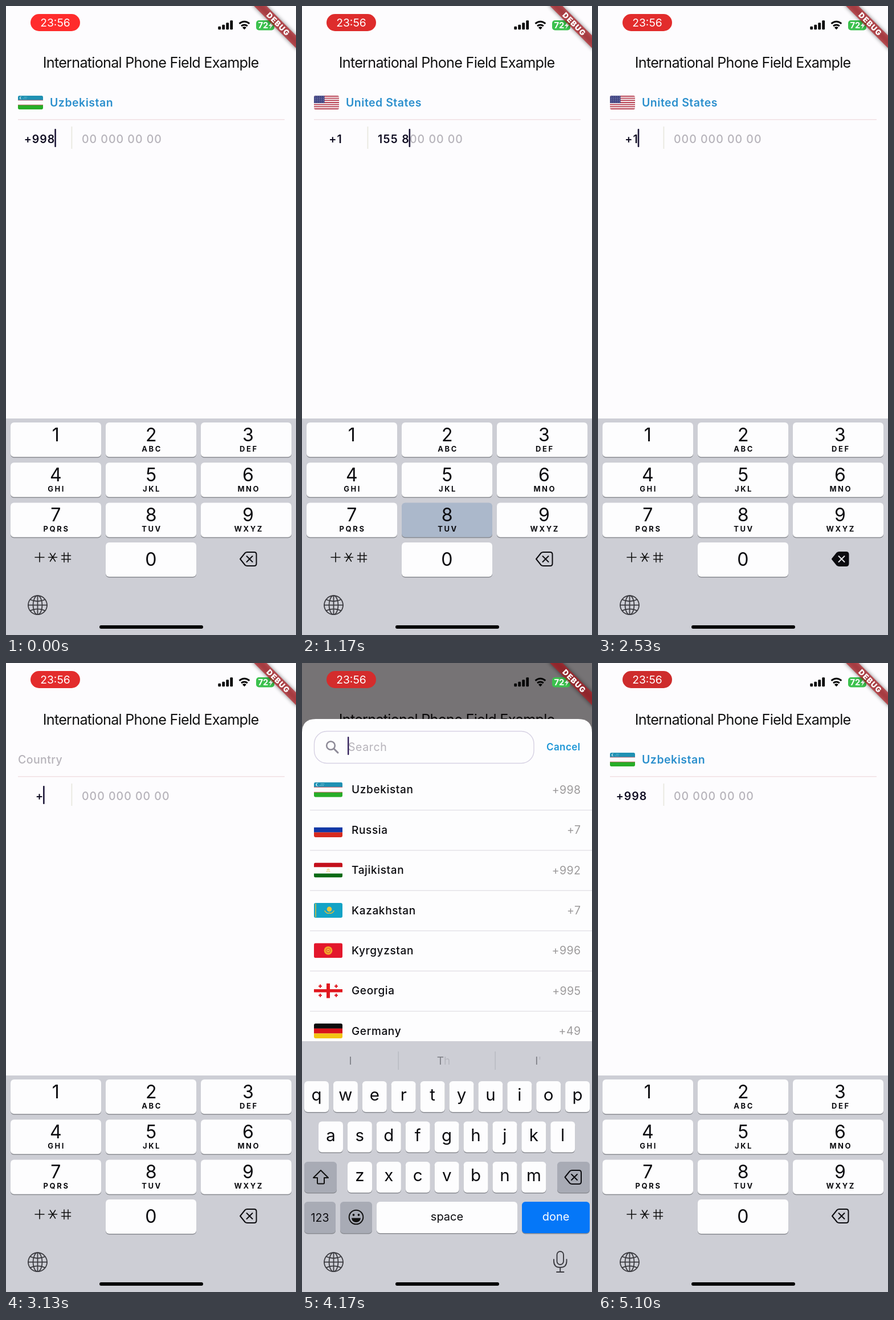
An HTML page for the animation above (5130 ms loop, 509 by 1101 pixels).

```html
<!DOCTYPE html>
<html lang="en">
<head>
<meta charset="utf-8">
<title>International Phone Field Example</title>
<style>
html, body { margin: 0; width: 100%; height: 100%; overflow: hidden; background: #fdfcfe; }
svg { display: block; width: 100%; height: 100%; }
text { font-family: Inter, Roboto, "Liberation Sans", sans-serif; white-space: pre; }
</style>
</head>
<body>
<svg id="stage" viewBox="0 0 509 1101"></svg>
<script>
const LOOP = 5130;
const NUMBER = '155 835 20 46';
const INK = '#100d22', HINT = '#b6b3ba', BOARD = '#cdced5', GREY = '#a8abb5', BLUE = '#2b8fcd';
const KEY = '#fdfdfe', PRESSED = '#abb8cb';

// Drawing helpers
const rect = (x, y, w, h, fill, r = 0, more = '') =>
  `<rect x="${x}" y="${y}" width="${w}" height="${h}" rx="${r}" fill="${fill}" ${more}/>`;
const line = (d, w = 2, color = '#111', more = '') =>
  `<path d="${d}" fill="none" stroke="${color}" stroke-width="${w}" stroke-linecap="round" stroke-linejoin="round" ${more}/>`;
const circle = (x, y, r, fill, more = '') => `<circle cx="${x}" cy="${y}" r="${r}" fill="${fill}" ${more}/>`;
const text = (x, y, s, size, { fill = '#0b0b0f', weight = 400, ls = 0, anchor = 'start', id = '' } = {}) => {
  const shift = anchor === 'middle' ? ls / 2 : anchor === 'end' ? ls : 0;
  return `<text ${id && `id="${id}"`} x="${x + shift}" y="${y}" font-size="${size}" font-weight="${weight}" ` +
    `letter-spacing="${ls}" text-anchor="${anchor}" fill="${fill}">${s}</text>`;
};
const mid = (x, y, s, size, o = {}) => text(x, y, s, size, { anchor: 'middle', ...o });
const group = (id, body) => `<g id="${id}">${body}</g>`;
const times = (n, f) => Array.from({ length: n }, (_, i) => f(i)).join('');

// Flags on a 50 x 26 field
const bands = (...c) => c.map((k, i) => rect(0, i * 26 / 3, 50, 8.8, k)).join('');
const FLAGS = {
  uz: bands('#1f91b3', '#fcfcfc', '#27ad27') + rect(0, 8.2, 50, .9, '#cf5a66') + rect(0, 17, 50, .9, '#cf5a66') +
    circle(6, 4.2, 2.6, '#eaf6f9') + circle(7.1, 4.2, 2.3, '#1f91b3') +
    times(4, i => circle(10.5 + i * 2, 5.8, .5, '#eaf6f9') + circle(12.5 + i * 1.6, 3, .5, '#eaf6f9')),
  ru: bands('#fcfcfc', '#1238a6', '#d62a1e'),
  tj: rect(0, 0, 50, 8, '#c4101c') + rect(0, 8, 50, 11, '#fcfcfc') + rect(0, 19, 50, 7, '#0a6a14') +
    line('M22 15.5Q25 13.5 28 15.5M23 12.5L25 11L27 12.5', 1.1, '#ecc968'),
  kz: rect(0, 0, 50, 26, '#12a3c6') + rect(2, 1, 2, 24, '#a9b95a') + circle(27, 11, 4.3, '#e8c63c') +
    line('M19 14Q23 20 27 17.5Q31 20 35 14', 1.7, '#d9bd3e'),
  kg: rect(0, 0, 50, 26, '#e3172c') + circle(25, 13, 7.4, '#f2a62a') + circle(25, 13, 4.2, '#e3402c') +
    circle(25, 13, 3.2, '#f6c63c') + line('M23 12Q25 14 27 12M23 14Q25 12 27 14', .7, '#d0342a'),
  ge: rect(0, 0, 50, 26, '#fcfcfc') + rect(22, 0, 6, 26, '#e0181f') + rect(0, 10.3, 50, 5.4, '#e0181f') +
    [[11, 5], [39, 5], [11, 21], [39, 21]].map(([x, y]) =>
      rect(x - 3, y - 1, 6, 2, '#e0181f') + rect(x - 1, y - 3, 2, 6, '#e0181f')).join(''),
  de: bands('#0c0c0c', '#d8141c', '#f2c414'),
  us: times(13, i => rect(0, i * 2, 50, 2.05, i % 2 ? '#f7eff1' : '#b33447')) + rect(0, 0, 21, 14, '#3f4382') +
    times(20, i => circle(2.5 + i % 5 * 4, 2 + (i / 5 | 0) * 3.3, .65, '#c9cae0'))
};
const flag = (code, x, y, w, h) =>
  `<g transform="translate(${x} ${y}) scale(${w / 50} ${h / 26})" clip-path="url(#round)">${FLAGS[code]}</g>`;

// Page
const country = (id, name) => group(id,
  flag(id, 21, 157, 44, 24) + text(77, 176.3, name, 19.5, { fill: BLUE, weight: 600, ls: .5 }));
const page = rect(0, 0, 509, 1101, '#fdfcfe') +
  mid(254.5, 108, 'International Phone Field Example', 25.2, { ls: -.74, fill: '#111' }) +
  country('uz', 'Uzbekistan') + country('us', 'United States') +
  group('none', text(21, 176.3, 'Country', 19.5, { fill: HINT, weight: 500, ls: .4 })) +
  rect(21, 198, 468, 1.5, '#f1e0e4') + rect(114.5, 211, 1.8, 39, '#e9e8e0') +
  mid(58.5, 240, '', 19.5, { id: 'code', weight: 600, ls: 1, fill: INK }) +
  `<text x="133" y="240" font-size="19.5"><tspan id="typed" font-weight="600" letter-spacing="1.3" fill="${INK}"></tspan>` +
  `<tspan id="rest" font-weight="500" letter-spacing="1" fill="${HINT}"></tspan></text>` +
  rect(0, 215, 2.6, 32, '#1d1738', 1, 'id="caret"');

// Country sheet
const ROWS = [['uz', 'Uzbekistan', 998], ['ru', 'Russia', 7], ['tj', 'Tajikistan', 992], ['kz', 'Kazakhstan', 7],
  ['kg', 'Kyrgyzstan', 996], ['ge', 'Georgia', 995], ['de', 'Germany', 49], ['us', 'United States', 1]];
const sheet = `<path d="M0 1101V122Q0 98 24 98H485Q509 98 509 122V1101Z" fill="#fdfdfe"/>` +
  rect(21.5, 119.5, 385.5, 56, 'none', 22, 'stroke="#d6d1e3" stroke-width="1.4"') +
  circle(50.5, 144.5, 7.3, 'none', 'stroke="#8e8b98" stroke-width="2.6"') + line('M56 150L63 157', 3, '#8e8b98') +
  text(81, 154, 'Search', 19.5, { fill: HINT, ls: .6 }) + rect(80, 129, 2.4, 32, '#32205a', 1, 'id="seek"') +
  text(429, 153, 'Cancel', 17, { fill: '#1d96d6', weight: 600, ls: .4 }) +
  ROWS.map(([code, name, dial], i) => {
    const y = 221.7 + i * 70.4;
    return flag(code, 21, y - 13, 50, 26) + text(87, y + 6.6, name, 19, { weight: 500, ls: .65 }) +
      text(489, y + 7, '+' + dial, 19.5, { fill: '#9d9b9c', ls: .4, anchor: 'end' }) +
      rect(14, y + 35.2, 495, 1.3, '#e1dfe5');
  }).join('');

// Keyboards
const key = (x, y, w, h, fill = KEY, id = '') =>
  rect(x, y + 1.5, w, h, '#898b91', 6) + rect(x, y, w, h, fill, 6, id && `id="${id}"`);
const globe = circle(55.5, 1048.7, 16.5, 'none', 'stroke="#3b3b40" stroke-width="1.8"') +
  `<ellipse cx="55.5" cy="1048.7" rx="8" ry="16.5" fill="none" stroke="#3b3b40" stroke-width="1.8"/>` +
  line('M55.5 1032V1065M39 1048.7H72M42.5 1039Q55.5 1045 68.5 1039M42.5 1058.4Q55.5 1052.4 68.5 1058.4', 1.8, '#3b3b40');
const erase = (x, y, id) =>
  line(`M${x - 15.5} ${y}L${x - 7} ${y - 10.5}Q${x - 5.5} ${y - 12} ${x - 3} ${y - 12}H${x + 9}Q${x + 13} ${y - 12} ${x + 13} ${y - 8}` +
    `V${y + 8}Q${x + 13} ${y + 12} ${x + 9} ${y + 12}H${x - 3}Q${x - 5.5} ${y + 12} ${x - 7} ${y + 10.5}Z`, 2, '#0b0b0f', `id="${id}"`) +
  line(`M${x - 4} ${y - 5}l10 10m0 -10l-10 10`, 2, '#0b0b0f', `id="${id}X"`);

const LETTERS = ['', 'ABC', 'DEF', 'GHI', 'JKL', 'MNO', 'PQRS', 'TUV', 'WXYZ'];
const CENTERS = [87.3, 254.7, 425];
const pad = rect(0, 722, 509, 379, BOARD) + LETTERS.map((s, i) => {
  const c = i % 3, y = 729 + (i / 3 | 0) * 70.2;
  return key(8 + c * 167, y, 159, 60.3, KEY, 'k' + (i + 1)) +
    mid(CENTERS[c], y + 33, i + 1, 32) + mid(CENTERS[c], y + 51, s, 13, { weight: 700, ls: 2.6 });
}).join('') + key(175, 939, 159, 60, KEY, 'k0') + mid(254.3, 980, 0, 32) +
  line('M51 965H67M59 957V973M74.5 965H89.5M77.5 958L86.5 972M86.5 958L77.5 972', 1.6) +
  line('M102 957V973.5M109 957V973.5M97.5 962H113.5M97.5 968.5H113.5', 1.5) +
  erase(426.5, 968, 'del');

const alphaRow = (s, x, y) => [...s].map((c, i) =>
  key(x + i * 50.9, y, 43, 54) + mid(x + i * 50.9 + 21.5, y + 34, c, 29.5)).join('');
const fading = s => [...s].map((c, i) => `<tspan class="fade${i}">${c}</tspan>`).join('');
const qwerty = rect(0, 662, 509, 439, BOARD) +
  ['I', 'The', "I'm"].map((s, i) => mid([85, 254, 423][i], 703, fading(s), 19, { fill: '#33343a' })).join('') +
  rect(168.5, 680, 1.3, 32, '#b6b7bf') + rect(338.5, 680, 1.3, 32, '#b6b7bf') +
  alphaRow('qwertyuiop', 4, 732) + alphaRow('asdfghjkl', 29, 802.5) + alphaRow('zxcvbnm', 80, 873) +
  key(4, 873, 57, 54, GREY) + key(448, 873, 57, 54, GREY) + erase(477, 900, 'back') +
  line('M33 888L46 901H39V910Q39 911.5 37.5 911.5H28.5Q27 911.5 27 910V901H20Z', 2) +
  key(4, 943, 55, 55, GREY) + mid(31.5, 978, '123', 19.5) +
  key(67, 943, 56, 55, GREY) + circle(95, 970, 12.3, 'none', 'stroke="#111" stroke-width="2"') +
  circle(90.5, 966, 1.9, '#111') + circle(99.5, 966, 1.9, '#111') + `<path d="M87 971.5H103Q102 979 95 979Q88 979 87 971.5Z" fill="#111"/>` +
  key(131, 943, 247, 55) + mid(254.5, 976, 'space', 20) +
  key(386, 943, 119, 55, '#0577f8') + mid(445.5, 976, 'done', 20, { fill: '#fff' }) +
  rect(447.5, 1030, 11.5, 23, 'none', 5.75, 'stroke="#3b3b40" stroke-width="1.9"') +
  line('M442 1044V1047Q442 1058 453.2 1058Q464.5 1058 464.5 1047V1044M453.2 1058V1066M447 1066H459.5', 1.9, '#3b3b40');

// Status bar and banner
const bar = rect(43, 14, 87, 30, '#ff2a3a', 15, 'id="pill"') + mid(86.5, 36, '23:56', 19.3, { fill: '#fff' }) +
  [5.5, 8.5, 12, 16].map((h, i) => rect(372.3 + i * 7, 41.2 - h, 4.8, h, '#050505', 1.3)).join('') +
  line('M409.5 30.8Q418.4 23.6 427.3 30.8M413 35Q418.4 30.8 423.8 35', 2.9, '#050505', 'style="stroke-linecap:butt"') +
  `<path d="M418.4 41.3L414.9 37.7Q418.4 35 421.9 37.7Z" fill="#050505"/>` +
  rect(439, 25, 32, 17.5, '#3cc14e', 5) + text(442.5, 39.3, '72', 14.8, { fill: '#fff', weight: 700 }) +
  `<path d="M467 27.5L461 35H464.5L462.5 40.5L469 32.5H465.5Z" fill="#fff"/>`;
const banner = `<g transform="translate(509 0) rotate(45)">` +
  rect(-56, 36.5, 112, 15.7, '#000', 0, 'opacity=".5" filter="url(#soft)"') +
  rect(-56, 36.5, 112, 15.7, 'rgba(183,28,36,.68)') +
  mid(0, 49.2, 'DEBUG', 13.2, { fill: '#fff', weight: 900, ls: 1.2 }) + '</g>';

document.getElementById('stage').innerHTML =
  `<defs><clipPath id="round"><rect width="50" height="26" rx="3"/></clipPath>` +
  `<filter id="soft" x="-20%" y="-80%" width="140%" height="260%"><feGaussianBlur stdDeviation="3.6"/></filter></defs>` +
  page + rect(0, 0, 509, 1101, '#040002', 0, 'id="shade"') + group('sheet', sheet) +
  group('pad', pad) + group('qwerty', qwerty) + globe + rect(164, 1084, 182, 6, '#050505', 3) + bar + banner;

const $ = Object.fromEntries([...document.querySelectorAll('[id]')].map(e => [e.id, e]));
const hints = [0, 1, 2].map(i => document.querySelectorAll('.fade' + i));

// Timeline, all in ms
const CODE = [[0, '+998'], [280, '+99'], [400, '+9'], [520, '+'], [750, '+1'], [2565, '+'],
  [3180, '+9'], [3320, '+99'], [3460, '+998']];
const COUNTRY = [[0, 'uz'], [280, 'none'], [750, 'us'], [2565, 'none'], [3460, 'uz']];
const MASK = [[0, '00 000 00 00'], [750, '000 000 00 00'], [3460, '00 000 00 00']];
const FOCUS = [[0, 'code'], [750, 'number'], [2450, 'code'], [3460, 'number']];
const BLINK = [[0, 1], [1540, 1], [1640, .3], [1720, 0], [1780, 1], [2720, 1], [2780, 0], [2900, 0], [2950, 1],
  [3640, 1], [3700, 0], [4840, 0], [4880, 1], [4980, 1], [5040, 0], [LOOP, 0]];
const PILL = [[0, 255], [1170, 222], [1570, 227], [2530, 226], [3530, 228], [4170, 212], [LOOP, 206]];
const TYPE = 955, GAP = 65, CUT = 1900, CUT_GAP = 55;
const DIGITS = NUMBER.replace(/ /g, '');
const PRESSES = [...[...DIGITS].map((d, i) => [d, TYPE + i * GAP]), ['1', 750], ['9', 3180], ['9', 3320], ['8', 3460]];
const ERASES = [[260, 340], [380, 460], [500, 580], [1880, 2600]];
const OPEN = 3860, CLOSE = 4600, SWAP_IN = 4050, SWAP_OUT = 4770;

const clamp = v => Math.min(1, Math.max(0, v));
const ease = v => 1 - (1 - clamp(v)) ** 3;
const index = (table, t) => table.findLastIndex(([at]) => at <= t);
const step = (table, t) => table[index(table, t)][1];
const lerp = (table, t) => {
  const i = index(table, t), [a, v] = table[i], [b, w] = table[i + 1] || [LOOP, v];
  return v + (w - v) * clamp((t - a) / (b - a));
};
const count = (start, gap, t) => Math.min(10, Math.max(0, Math.floor((t - start) / gap) + 1));
// Length of the formatted number holding n digits
const cut = n => n + (n > 3) + (n > 6) + (n > 8);
const show = (el, v) => el.setAttribute('opacity', v);

function draw(t) {
  const i = index(COUNTRY, t), k = i ? clamp((t - COUNTRY[i][0]) / 140) : 1;
  for (const id of ['uz', 'us', 'none'])
    show($[id], id === COUNTRY[i][1] ? k : i && id === COUNTRY[i - 1][1] ? 1 - k : 0);

  const n = cut(count(TYPE, GAP, t) - count(CUT, CUT_GAP, t));
  $.code.textContent = step(CODE, t);
  $.typed.textContent = NUMBER.slice(0, n);
  $.rest.textContent = step(MASK, t).slice(n);

  const x = step(FOCUS, t) === 'code'
    ? 58 + $.code.getComputedTextLength() / 2
    : 132 + (n ? $.typed.getComputedTextLength() - .5 : 0);
  $.caret.setAttribute('x', x);
  show($.caret, lerp(BLINK, t));

  for (let d = 0; d < 10; d++) {
    const down = PRESSES.some(([c, at]) => +c === d && t >= at - 20 && t < at + 45);
    $['k' + d].setAttribute('fill', down ? PRESSED : KEY);
  }
  const held = ERASES.some(([a, b]) => t >= a && t < b);
  $.del.setAttribute('fill', held ? '#0b0b0f' : 'none');
  $.delX.setAttribute('stroke', held ? '#e4e4e8' : '#0b0b0f');

  const up = t < CLOSE ? ease((t - OPEN) / 200) : 1 - ease((t - CLOSE) / 200);
  show($.shade, .54 * up);
  $.sheet.setAttribute('transform', `translate(0 ${1003 * (1 - up)})`);
  const alpha = t >= SWAP_IN && t < SWAP_OUT;
  show($.qwerty, alpha ? 1 : 0);
  show($.pad, alpha ? 0 : 1);
  hints.forEach((spans, j) => spans.forEach(s =>
    s.setAttribute('fill-opacity', clamp((t - 4130 - 30 * j) / 80))));
  show($.seek, t % 533 > 400 && t > 4270 ? 0 : 1);
  $.pill.setAttribute('fill', `rgb(${Math.round(lerp(PILL, t))},44,44)`);
}

const start = performance.now();
function tick(now) {
  draw(Math.max(0, now - start) % LOOP);
  requestAnimationFrame(tick);
}
draw(0);
requestAnimationFrame(tick);
</script>
</body>
</html>
```
